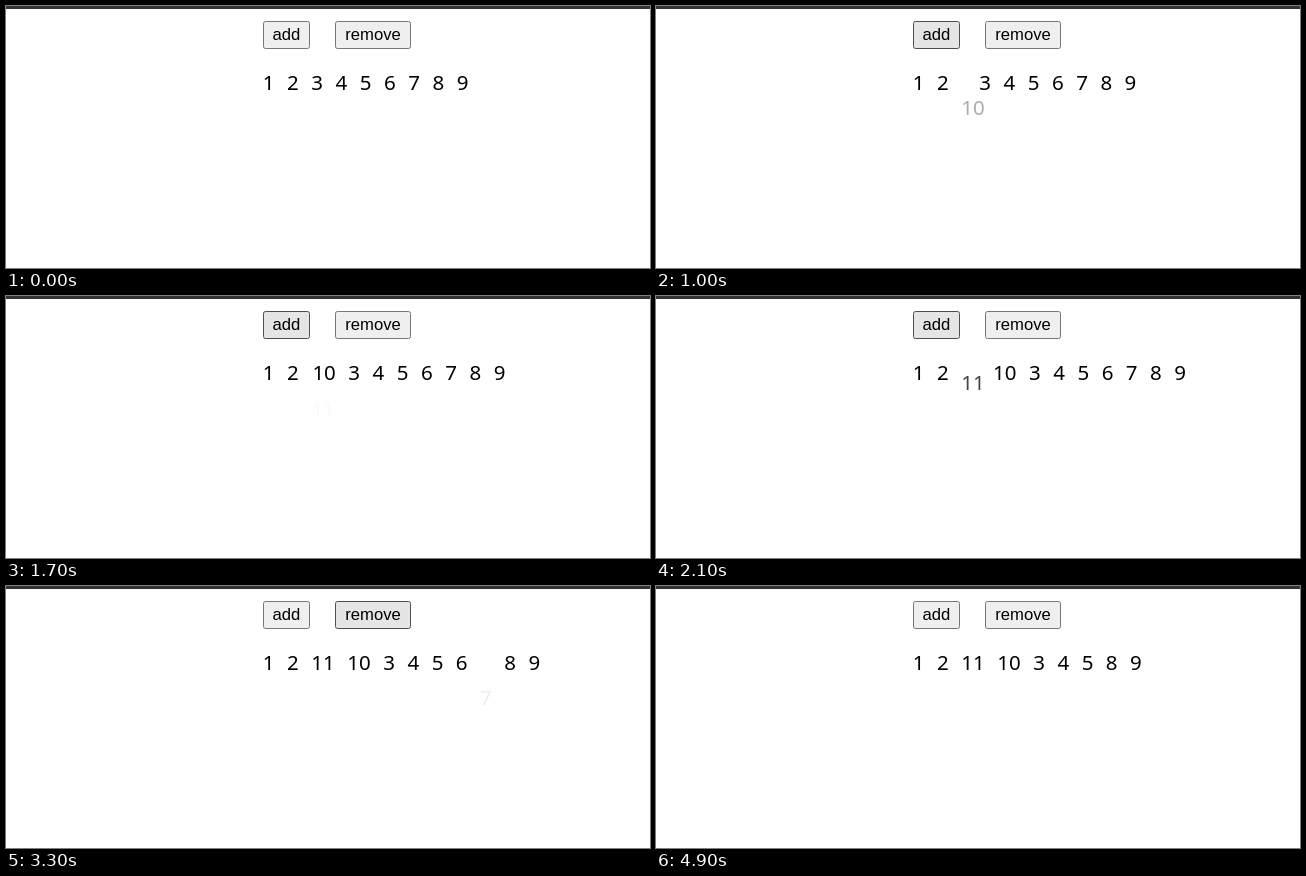
An HTML page for the animation above (5.1 s loop, 644 by 262 pixels).

```html
<!DOCTYPE html>
<html lang="en">
<head>
<meta charset="utf-8">
<title>List transition</title>
<style>
  html, body { margin: 0; width: 100%; height: 100%; overflow: hidden; background: #fff; }
  #stage { position: relative; width: 644px; height: 262px; overflow: hidden; }
  #bar { position: absolute; left: 0; top: 0; width: 100%; height: 3px; background: #343236; }
  .button {
    position: absolute; top: 15px; height: 28px; box-sizing: border-box;
    border: 1px solid #767676; border-radius: 2.5px; background: #efefef; color: #000;
    font: 16.667px/26px "Liberation Sans", Arial, sans-serif; text-align: center;
  }
  .button.hover { background: #e5e5e5; border-color: #4f4f4f; }
  .button.active { background: #f5f5f5; border-color: #8d8d8d; }
  #add { left: 257px; width: 47px; }
  #remove { left: 329px; width: 76px; }
  .item {
    position: absolute; left: 0; top: 62px; color: #000; white-space: nowrap;
    font: 20.5px/28px "Noto Sans", "Open Sans", sans-serif;
  }
</style>
</head>
<body>
<div id="stage">
  <div id="bar"></div>
  <div class="button" id="add">add</div>
  <div class="button" id="remove">remove</div>
</div>
<script>
const LOOP = 5100, STEP = 100;
const FADE = 1000, MOVE = 730, DROP = 37.5;
const LEFT = 256.8, DIGIT = 11.73, GAP = 12.5;

// Order in the list; born = insertion, leave/gone = removal
const items = [
  { label: "1" }, { label: "2" },
  { label: "11", born: 1665 }, { label: "10", born: 786 },
  { label: "3" }, { label: "4" }, { label: "5" },
  { label: "6", leave: 3925, gone: 4900 },
  { label: "7", leave: 2625, gone: 3600 },
  { label: "8" }, { label: "9" }
];

// [start time, state] per button
const states = {
  add: [[0, ""], [500, "hover"], [1600, "active"], [1700, "hover"], [2200, ""]],
  remove: [[0, ""], [100, "hover"], [400, ""], [2300, "hover"], [2600, "active"],
           [2700, "hover"], [3900, "active"], [4000, "hover"], [4600, ""]]
};

const stage = document.getElementById("stage");
for (const item of items) {
  item.el = document.createElement("span");
  item.el.className = "item";
  item.el.textContent = item.label;
  stage.append(item.el);
}

// CSS "ease": cubic-bezier(.25, .1, .25, 1)
function ease(x) {
  if (x <= 0) return 0;
  if (x >= 1) return 1;
  const curve = (a, b, s) => 3 * a * s * (1 - s) ** 2 + 3 * b * s * s * (1 - s) + s ** 3;
  let lo = 0, hi = 1;
  for (let i = 0; i < 24; i++) {
    const mid = (lo + hi) / 2;
    if (curve(0.25, 0.25, mid) < x) lo = mid; else hi = mid;
  }
  return curve(0.1, 1, lo);
}

function presence(item, t) {
  if (item.born) return ease((t - item.born) / FADE);
  if (item.leave) return t < item.gone ? 1 - ease((t - item.leave) / FADE) : 0;
  return 1;
}

// Share of its own width an item takes up in the row
function share(item, t) {
  if (item.born) return ease((t - item.born) / MOVE);
  return item.gone && t >= item.gone ? 0 : 1;
}

function render(t) {
  let x = LEFT;
  for (const item of items) {
    const p = presence(item, t);
    item.el.style.opacity = p;
    item.el.style.transform = `translate(${x}px, ${(1 - p) * DROP}px)`;
    x += (item.label.length * DIGIT + GAP) * share(item, t);
  }
  for (const id in states) {
    const state = states[id].filter(([start]) => start <= t).pop()[1];
    document.getElementById(id).className = "button " + state;
  }
}

const begin = performance.now();
function tick() {
  const t = (performance.now() - begin) % LOOP;
  render(Math.floor(t / STEP) * STEP);
  requestAnimationFrame(tick);
}
tick();
</script>
</body>
</html>
```
